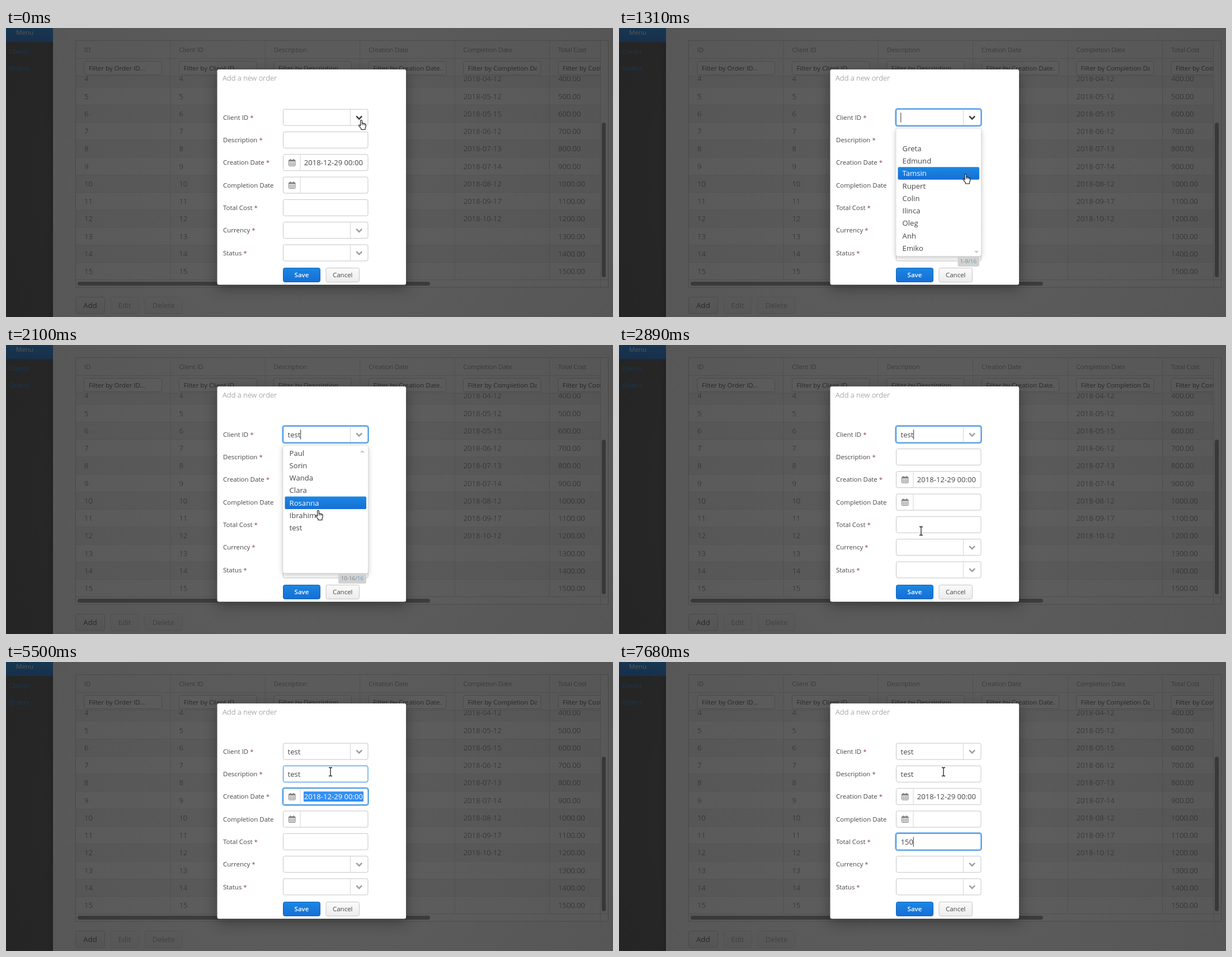
These frames come from a looping animation (1085x516 px, 8 s). An HTML page:

```html
<!DOCTYPE html>
<html lang="en">
<head>
<meta charset="utf-8">
<title>Add a new order</title>
<style>
  html, body { margin: 0; width: 100%; height: 100%; overflow: hidden; background: #5c5c5c; }
  svg { display: block; }
  #stage { width: 1085px; height: 516px; }
  text { font-family: "Open Sans", "Noto Sans", sans-serif; fill: #464646; }
  .light { font-weight: 300; }
  .box { fill: #fff; stroke: #c5c5c5; }
  .line { stroke: #d4d4d4; stroke-width: 1; }
  .dialog { filter: drop-shadow(0 6px 12px rgba(0, 0, 0, .35)); }
  .popup { filter: drop-shadow(0 3px 4px rgba(0, 0, 0, .22)); }
</style>
</head>
<body>
<svg id="stage" viewBox="0 0 1085 516">
  <defs>
    <radialGradient id="curtain" gradientUnits="userSpaceOnUse" cx="546" cy="266" r="610">
      <stop offset="0" stop-color="#222"/><stop offset="1" stop-color="#161616"/>
    </radialGradient>
    <linearGradient id="blue" x2="0" y2="1">
      <stop offset="0" stop-color="#1b87e3"/><stop offset="1" stop-color="#166ed5"/>
    </linearGradient>
    <linearGradient id="grey" x2="0" y2="1">
      <stop offset="0" stop-color="#fafafa"/><stop offset="1" stop-color="#ededed"/>
    </linearGradient>
    <linearGradient id="side">
      <stop offset="0" stop-color="#4b4b4b"/><stop offset=".85" stop-color="#4b4b4b"/><stop offset="1" stop-color="#3e3e3e"/>
    </linearGradient>
  </defs>
  <g id="page"></g>
  <rect width="1085" height="516" fill="url(#curtain)" opacity=".72"/>
  <g id="dialog"></g>
  <g id="popup"></g>
  <g id="hand">
    <path d="M3.6 11.2V2.2a1.4 1.4 0 0 1 2.8 0V7q.2-.8 1.3-.7 1.1.1 1.2 1 .3-.6 1.2-.5 1 .2 1.1 1.1.4-.5 1.1-.2.8.3.8 1.3V12q0 2-1.2 3.6V18H5V16.4Q2.5 13.6.8 11 .3 9.8 1.4 9.5 2.6 9.3 3.6 11.2Z"
      fill="#fff" stroke="#111" stroke-width="1.1" stroke-linejoin="round"/>
    <path d="M6.4 7V10M8.9 7.3V10M11.2 8V10.2" stroke="#111" stroke-width=".8"/>
  </g>
  <path id="beam" d="M-3-7.5H-1Q0-7.5 0-6.5 0-7.5 1-7.5H3M0-6.5V6.5M-3 7.5H-1Q0 7.5 0 6.5 0 7.5 1 7.5H3"
    fill="none" stroke="#1c1c1c" stroke-width="1.3"/>
</svg>
<script>
const LOOP = 8000, STEP = 76.5, BIG = 13.1, SMALL = 11.5;
const $ = id => document.getElementById(id);

function add(parent, tag, attrs, content) {
  const node = document.createElementNS('http://www.w3.org/2000/svg', tag);
  for (const key in attrs) node.setAttribute(key, attrs[key]);
  if (content !== undefined) node.textContent = content;
  return parent.appendChild(node);
}
const rect = (parent, x, y, width, height, attrs) => add(parent, 'rect', { x, y, width, height, ...attrs });
const line = (parent, x1, y1, x2, y2) => add(parent, 'line', { x1, y1, x2, y2, class: 'line' });
// y is the middle of the capitals
const label = (parent, x, y, size, content, attrs) =>
  add(parent, 'text', { x, y: y + size * 0.357, 'font-size': size, ...attrs }, content);

function button(parent, x, y, width, height, size, caption, primary) {
  const g = add(parent, 'g', {});
  rect(g, x, y, width, height, primary
    ? { rx: 3, fill: 'url(#blue)', stroke: '#1362b1' }
    : { rx: 3, fill: 'url(#grey)', stroke: '#c5c5c5' });
  label(g, x + width / 2, y + height / 2, size, caption,
    { 'text-anchor': 'middle', ...(primary && { 'font-weight': 600, style: 'fill:#fff' }) });
  return g;
}

function buildPage() {
  const page = $('page');
  rect(page, 0, 0, 1085, 516, { fill: '#fafafa' });
  rect(page, 0, 0, 84, 516, { fill: 'url(#side)' });
  rect(page, 0, 0, 84, 25, { fill: 'url(#blue)' });
  label(page, 18, 8, SMALL, 'Menu', { style: 'fill:#fff' });
  label(page, 5, 42, SMALL, 'Clients', { style: 'fill:#1a8af5' });
  label(page, 5, 72, SMALL, 'Orders', { style: 'fill:#1a8af5' });

  rect(page, 124.5, 22.5, 952, 440.5, { class: 'box' });
  const grid = add(page, 'svg', { width: 1062, height: 450 });
  const colX = i => 140 + 169.4 * i;
  const done = ['04-12', '05-12', '05-15', '06-12', '07-13', '07-14', '08-12', '09-17', '10-12'];
  for (let id = 4; id <= 15; id++) {
    const y = 90.6 + 31.27 * (id - 4);
    rect(grid, 125, y - 15.6, 937, 31.27, { fill: id % 2 ? '#fff' : '#f3f3f3' });
    line(grid, 125, y + 15.6, 1062, y + 15.6);
    const end = done[id - 4];
    [id, id, '', '2018-03-12', end ? '2018-' + end : '', id * 100 + '.00'].forEach((value, i) =>
      label(grid, colX(i), y, BIG, value, { class: 'light' }));
  }
  rect(grid, 125, 23, 937, 63, { fill: '#fafafa' });
  line(grid, 125, 54.5, 1062, 54.5);
  line(grid, 125, 86, 1062, 86);
  const titles = ['ID', 'Client ID', 'Description', 'Creation Date', 'Completion Date', 'Total Cost'];
  const filters = ['Order ID', 'Client ID', 'Description', 'Creation Date', 'Completion Date', 'Cost'];
  titles.forEach((title, i) => {
    const x = colX(i);
    if (i) line(grid, x - 15.5, 23, x - 15.5, 450);
    label(grid, x, 38.5, SMALL, title, { class: 'light' });
    rect(grid, x, 59.5, 138.5, 24, { class: 'box', rx: 3 });
    const clip = add(grid, 'svg', { x: x + 8, y: 60, width: 123.5, height: 23 });
    label(clip, 0, 11.7, SMALL, `Filter by ${filters[i]}...`);
  });
  line(page, 1062.5, 23, 1062.5, 463);
  line(page, 125, 449.5, 1076, 449.5);
  rect(page, 1065, 169, 7, 276, { rx: 3.5, fill: '#8c8c8c' });
  rect(page, 128, 453, 630, 7, { rx: 3.5, fill: '#8c8c8c' });

  button(page, 124.5, 480.5, 52, 29.5, BIG, 'Add');
  button(page, 187, 480.5, 50, 29.5, BIG, 'Edit').setAttribute('opacity', .5);
  button(page, 248, 480.5, 67, 29.5, BIG, 'Delete').setAttribute('opacity', .5);
}

function calendarIcon(parent, y) {
  const g = add(parent, 'g', { transform: `translate(505 ${y - 6.5})`, fill: 'none', stroke: '#808080' });
  rect(g, .5, 2, 11.5, 10.5, { rx: .8, 'stroke-width': 1 });
  rect(g, .5, 2, 11.5, 2.6, { fill: '#808080', stroke: 'none' });
  add(g, 'path', { d: 'M3.4 5V12M6.25 5V12M9.1 5V12M1 7.3H12M1 9.9H12', 'stroke-width': .7 });
  add(g, 'path', { d: 'M3.4 .2V3M9.1 .2V3', 'stroke-width': 1.8 });
}

const fields = [];
let caret, selection;

function buildDialog() {
  const dialog = $('dialog');
  rect(dialog, 377.5, 74, 337.5, 384.5, { rx: 3, fill: '#fff', class: 'dialog' });
  label(dialog, 387, 89, BIG, 'Add a new order', { class: 'light', style: 'fill:#7d7d7d' });
  const rows = [
    ['Client ID', 'combo', true], ['Description', 'text', true], ['Creation Date', 'date', true],
    ['Completion Date', 'date', false], ['Total Cost', 'text', true],
    ['Currency', 'combo', true], ['Status', 'combo', true]
  ];
  rows.forEach(([caption, kind, required], i) => {
    const y = 159.6 + 40.3 * i;
    const name = label(dialog, 388, y, SMALL, caption);
    if (required) add(name, 'tspan', { fill: '#8a4a50' }, ' *');
    const ring = rect(dialog, 494.2, y - 15.7, 153.8, 31.4,
      { rx: 4, fill: 'none', stroke: '#7fb6ef', 'stroke-width': 2 });
    const box = rect(dialog, 495.5, y - 14.5, 151.5, 29, { class: 'box', rx: 3 });
    const field = { y, ring, box, x: kind === 'date' ? 532.8 : 503.6 };
    if (kind === 'combo') {
      line(dialog, 615.5, y - 14, 615.5, y + 14);
      field.chevron = add(dialog, 'path',
        { d: `M626.2 ${y - 2.3}L631.2 ${y + 2.7} 636.2 ${y - 2.3}`, fill: 'none', 'stroke-width': 2.6 });
    } else if (kind === 'date') {
      line(dialog, 526, y - 14, 526, y + 14);
      calendarIcon(dialog, y);
    }
    if (i === 2) selection = rect(dialog, 532, y - 9, 107, 18, { fill: '#3390f5' });
    field.text = label(dialog, field.x, y + .4, BIG, '');
    fields.push(field);
  });
  caret = rect(dialog, 0, 0, 1, 17.5, { fill: '#333' });
  button(dialog, 495.5, 428.5, 66, 25, SMALL, 'Save', true);
  button(dialog, 572, 428.5, 59.5, 25, SMALL, 'Cancel');
}

const lists = [
  ['', 'Greta', 'Edmund', 'Tamsin', 'Rupert', 'Colin', 'Ilinca', 'Oleg', 'Anh', 'Emiko'],
  ['Paul', 'Sorin', 'Wanda', 'Clara', 'Rosanna', 'Ibrahim', 'test']
];
const itemY = i => 192.8 + 22.22 * i;
let highlight, pages;

function buildPopup() {
  const popup = $('popup');
  const sheet = add(popup, 'g', { class: 'popup' });
  rect(sheet, 495, 179, 152.5, 228.5, { rx: 3, fill: '#fff', stroke: '#cfcfcf', 'stroke-width': .6 });
  highlight = rect(popup, 498.5, 0, 145.5, 22.4, { rx: 2, fill: 'url(#blue)' });
  pages = lists.map((items, n) => {
    const g = add(popup, 'g', {});
    items.forEach((item, i) => label(g, 506.6, itemY(i) + .3, BIG, item));
    const left = n ? 594 : 605.5;
    add(g, 'path', { d: `M${left} 408H644V423Q644 426 641 426H${left + 3}Q${left} 426 ${left} 423Z`, fill: '#d2d2d2' });
    const status = label(g, 639, 417, 9.8, n ? '10-16' : '1-9', { 'text-anchor': 'end', style: 'fill:#6f858c' });
    add(status, 'tspan', { fill: '#5f9db5' }, '/16');
    add(g, 'path', { d: n ? 'M633 192H641L637 188Z' : 'M635 398H643L639 402Z', fill: '#c8c8c8' });
    return g;
  });
}

// Tracks are [time, value] pairs; each value holds until the next one
const at = (track, t) => track.reduce((value, [time, next]) => t >= time ? next : value, track[0][1]);

const focusTrack = [[0, -1], [760, 0], [3560, 1], [5500, 2], [5740, 3], [6120, 4]];
const caretTrack = [[0, 0], [840, 1], [3560, 0], [3640, 1], [4030, 0], [4490, 1],
  [5500, 0], [5740, 1], [6670, 0], [7210, 1]];
const pageTrack = [[0, -1], [1000, 0], [1620, 1], [2730, -1]];
const hoverTrack = [[0, -1], [1156, 1], [1233, 2], [1309, 3], [1620, 6], [1776, 3], [2006, 4], [2180, 5], [2333, 6]];
const typing = (word, times) => [[0, ''], ...times.map((time, i) => [time, word.slice(0, i + 1)])];
const textTracks = [
  [[0, ''], [1620, 'test']],
  typing('test', [4490, 4570, 4800, 4960]),
  [[0, '2018-12-29 00:00']],
  [[0, '']],
  typing('150', [7370, 7450, 7680])
];
// Pointer moves: start time, number of hops, destination
const moves = [
  [0, 1, 630, 163.5], [70, 1, 630.5, 164], [220, 2, 627, 165], [1080, 4, 614.5, 260], [1390, 1, 614, 260],
  [1700, 6, 553, 294.5], [2180, 4, 535, 328], [2500, 1, 535, 327],
  [2730, 1, 540, 333], [2810, 1, 540, 332], [2955, 8, 580, 196]
];

function pointer(t) {
  let x = 630, y = 163.5;
  for (const [start, hops, toX, toY] of moves) {
    if (t < start) break;
    const part = Math.min(1, (Math.floor((t - start) / STEP) + 1) / hops);
    x += (toX - x) * part;
    y += (toY - y) * part;
  }
  return `translate(${x} ${y})`;
}

const show = (node, on) => node.setAttribute('visibility', on ? 'visible' : 'hidden');

// Border tint left behind after a field loses focus
function tint(i, t) {
  const n = focusTrack.findIndex(([, field]) => field === i);
  if (n < 0 || t < focusTrack[n][0]) return 0;
  const lost = focusTrack[n + 1];
  if (!lost || t < lost[0]) return 1;
  const age = t - lost[0];
  return age < 80 ? 1 : i && age < 155 ? .4 : 0;
}

function draw(t) {
  const focus = at(focusTrack, t);
  fields.forEach((field, i) => {
    const k = tint(i, t), mix = (a, b) => Math.round(a + (b - a) * k);
    show(field.ring, i === focus);
    field.box.style.stroke = `rgb(${mix(197, 27)},${mix(197, 125)},${mix(197, 220)})`;
    if (textTracks[i]) field.text.textContent = at(textTracks[i], t);
    if (field.chevron) field.chevron.setAttribute('stroke', i === 0 && t < 1620 ? '#3c3c3c' : '#a0a0a0');
  });
  show(selection, focus === 2);
  fields[2].text.style.fill = focus === 2 ? '#fff' : '';

  show(caret, focus >= 0 && at(caretTrack, t));
  if (focus >= 0) {
    const { x, y, text } = fields[focus];
    caret.setAttribute('x', x - .3 + (text.textContent ? text.getComputedTextLength() : 0));
    caret.setAttribute('y', y - 8.5);
  }

  const page = at(pageTrack, t), hover = at(hoverTrack, t);
  $('popup').style.display = page < 0 ? 'none' : '';
  pages.forEach((g, n) => {
    g.style.display = n === page ? '' : 'none';
    g.querySelectorAll(':scope > text').forEach((item, i) => {
      if (i < lists[n].length) item.style.fill = i === hover ? '#fff' : '';
    });
  });
  highlight.style.display = hover < 0 ? 'none' : '';
  highlight.setAttribute('y', itemY(hover) - 11.2);

  const place = pointer(t), beam = t >= 2730;
  $('hand').setAttribute('transform', place);
  $('beam').setAttribute('transform', place);
  show($('hand'), !beam);
  show($('beam'), beam);
}

buildPage();
buildDialog();
buildPopup();
const begin = performance.now();
function tick() {
  draw((performance.now() - begin) % LOOP);
  requestAnimationFrame(tick);
}
tick();
</script>
</body>
</html>
```
